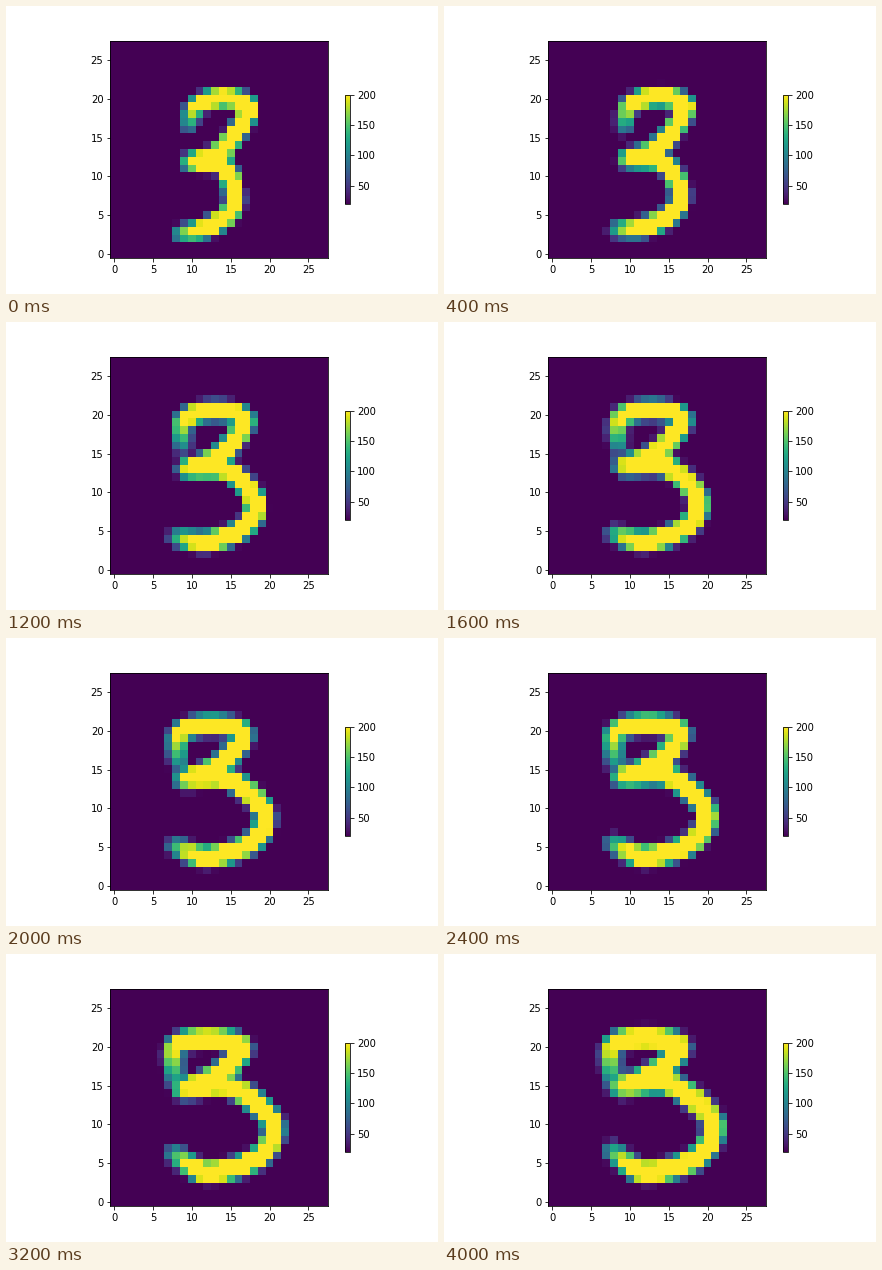
A matplotlib script that plays this animation: 432 by 288 pixels, repeating every 4.2 s.

```python
import numpy as np
import matplotlib.pyplot as plt
from matplotlib.animation import FuncAnimation

FRAMES, INTERVAL, GRID = 21, 200, 28

# Key points (column, row) along the pen stroke, from the upper left to the tail.
FIRST = np.array([(9.6, 16.5), (10.6, 19), (14, 20.1), (17.2, 19), (15.6, 15.4), (13, 12.7),
                  (9.8, 11.8), (14, 11.3), (15.4, 8), (15, 5.5), (12.2, 3.5), (8.5, 2.6)])
LAST = np.array([(8, 15), (7.8, 20), (12, 21.05), (16.3, 20.2), (14.8, 17.8), (12, 16),
                 (8.8, 14.7), (15, 15.2), (20.6, 10.5), (18.7, 5.8), (12, 3.9), (7.8, 6.6)])
HOOK, TAIL = 6, len(FIRST) - 1

COLS, ROWS = np.meshgrid(np.arange(GRID), np.arange(GRID))


def pose_at(t):
    """Ease out from the first pose to the last, sideways faster than upwards."""
    ease = 1 - (1 - t) ** np.array([2, 1.45])
    return FIRST + ease * (LAST - FIRST)


def catmull_rom(points, s):
    padded = np.vstack([points[:1], points, points[-1:]])
    i = np.minimum(s.astype(int), len(points) - 2)
    u = (s - i)[:, None]
    a, b, c, d = (padded[i + k] for k in range(4))
    return b + .5 * u * (c - a + u * (2 * a - 5 * b + 4 * c - d
                                      + u * (3 * (b - c) + d - a)))


def pressure(s):
    """Light at both ends and where the stroke turns back."""
    ends = np.minimum(.3 + .5 * s, .4 + .7 * (TAIL - s)).clip(0, 1)
    return ends * (1 - .4 * np.exp(-((s - HOOK) / .4) ** 2))


def digit(frame):
    t = frame / (FRAMES - 1)
    s = np.linspace(0, TAIL, 200)
    x, y = catmull_rom(pose_at(t), s).T
    dist = np.hypot(COLS[..., None] - x, ROWS[..., None] - y)
    ink = pressure(s) * np.exp(-(dist / (1.28 + .17 * t)) ** 3)
    return 280 * ink.max(axis=2)


fig, ax = plt.subplots(figsize=(6, 4), dpi=72)
fig.subplots_adjust(left=.125, right=.9, bottom=.125, top=.88)
image = ax.imshow(digit(0), origin="lower", cmap="viridis", vmin=20, vmax=200,
                  interpolation="nearest")
ax.set_xticks(range(0, 26, 5))
ax.set_yticks(range(0, 26, 5))
fig.colorbar(image, ax=ax, shrink=.5, ticks=range(50, 201, 50))


def update(frame):
    image.set_data(digit(frame))
    return [image]


anim = FuncAnimation(fig, update, frames=FRAMES, interval=INTERVAL, repeat=True,
                     repeat_delay=0)
plt.show()
```
